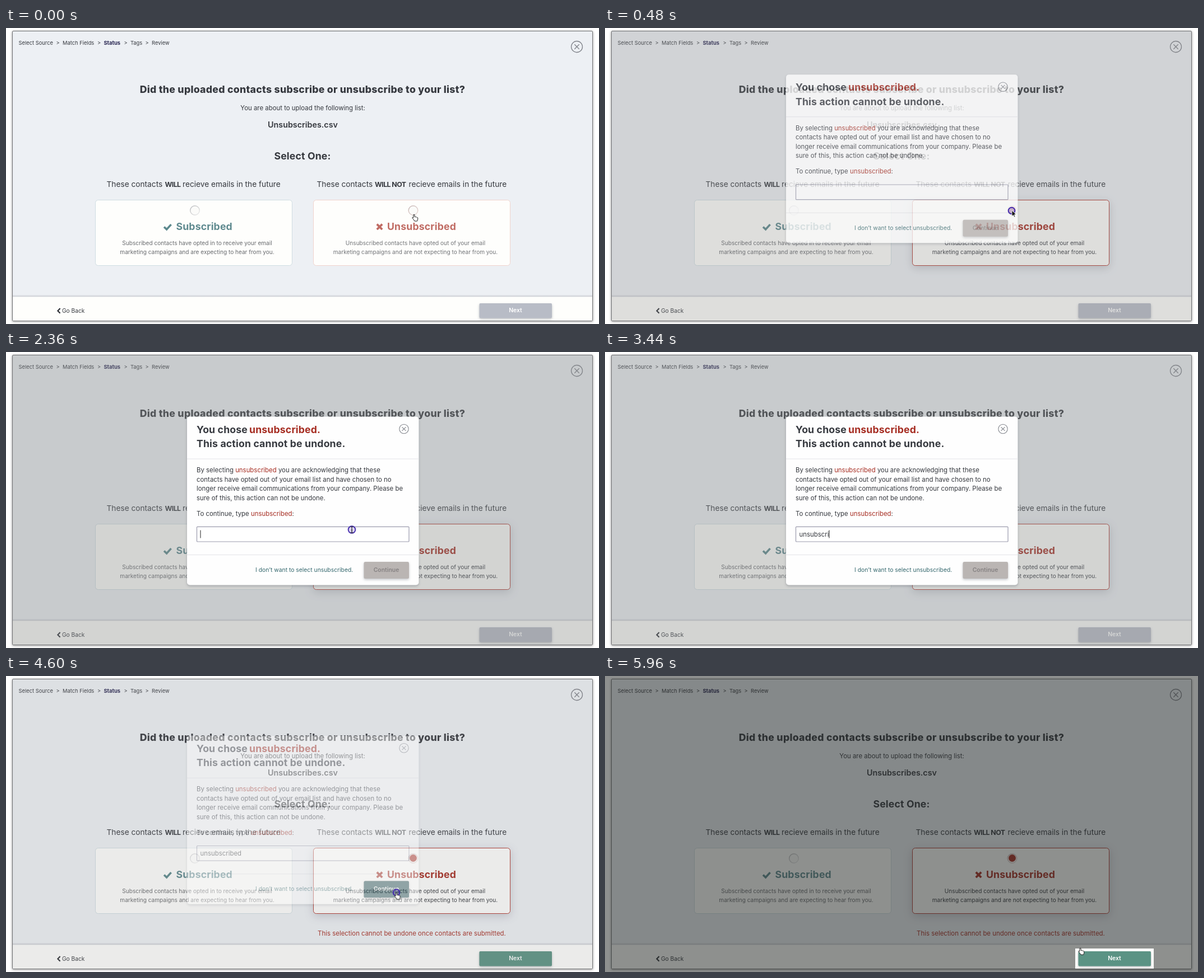
These frames come from a looping animation (1058 px wide and 529 px high, 6040 ms). An HTML page:

```html
<!DOCTYPE html>
<html lang="en">
<head>
<meta charset="utf-8">
<title>Contact status</title>
<style>
html, body { margin: 0; width: 100%; height: 100%; overflow: hidden; background: #fff; }
svg { display: block; width: 1058px; height: 529px; }
text { font-family: Inter, "Open Sans", sans-serif; font-size: 11.42px; fill: #36393f; white-space: pre; }
.mid { text-anchor: middle; }
.crumb { font-size: 9.35px; }
.head { font-size: 17.7px; font-weight: 800; letter-spacing: .27px; }
.sub { font-size: 17.7px; font-weight: 700; letter-spacing: .14px; }
.file { font-size: 14.3px; font-weight: 600; }
.fate { font-size: 13.7px; }
.loud { font-size: 12.4px; font-weight: 700; letter-spacing: -.6px; }
.desc { font-size: 10.08px; }
.btn { font-size: 10.4px; font-weight: 600; }
.link { font-size: 10.35px; fill: #35686e; }
.red { fill: #a62d22; }
.cross { fill: none; stroke: #82858c; stroke-width: 1.3; }
.rule { stroke: #e4e4e8; }
.window { filter: drop-shadow(0 1px 2px rgba(0,0,0,.4)); }
.soft { filter: drop-shadow(0 2px 2px rgba(60,65,80,.3)); }
.raised { filter: drop-shadow(0 4px 8px rgba(50,55,75,.22)); }

/* One loop is 6040 ms; 1% is 60.4 ms. */
.veil, .slide, .pick, .firm, .ready, .dim, .mouse, .hand, .arrow, .beam, .ring, .hold {
  animation: 6040ms linear infinite both;
}
.veil { animation-name: veil; }
.slide { animation-name: slide; }
.pick { animation-name: pick; }
.firm { animation-name: firm; }
.ready { animation-name: ready; }
.dim { animation-name: dim; }
.mouse { animation-name: mouse; animation-timing-function: ease-in-out; }
.hand { animation-name: hand; animation-timing-function: step-end; }
.arrow { animation-name: arrow; animation-timing-function: step-end; }
.beam { animation-name: beam; animation-timing-function: step-end; }
.hold { animation-name: hold; animation-timing-function: step-end; }
.ring { animation-name: ring; }
.ring, .hold { fill: #4a2cb5; fill-opacity: .2; stroke: #432aae; stroke-width: 2; }

@keyframes veil {
  0%, 7.28% { opacity: 0; }
  7.95% { opacity: .74; }
  8.28%, 75.55% { opacity: 1; }
  76.16% { opacity: .45; }
  76.7%, 100% { opacity: 0; }
}
@keyframes slide {
  0%, 7.81% { transform: translateY(-35.5px); animation-timing-function: ease-out; }
  10.6%, 75.55% { transform: none; }
  76.16% { transform: translateY(-8.5px); }
  77%, 100% { transform: translateY(-24px); }
}
@keyframes pick { 0%, 6.9% { opacity: 0; } 7.6%, 100% { opacity: 1; } }
@keyframes firm { 0%, 6.9% { opacity: .7; } 7.6%, 100% { opacity: 1; } }
@keyframes ready { 0%, 63.6% { opacity: 0; } 65.6%, 100% { opacity: 1; } }
@keyframes dim { 0%, 89.4% { opacity: 0; } 98.6%, 100% { opacity: 1; } }
@keyframes mouse {
  0%, .6% { transform: translate(728px, 333px); }
  6.6%, 11.5% { transform: translate(726px, 326px); }
  11.6%, 23.18% { transform: translate(726px, 327px); }
  27% { transform: translate(690px, 332px); }
  32.4%, 64.2% { transform: translate(617px, 317.5px); }
  72.85%, 89.4% { transform: translate(696.5px, 387px); }
  98%, 100% { transform: translate(848px, 486px); }
}
@keyframes hand { 0% { opacity: 1; } 7.12% { opacity: 0; } 70.1%, 100% { opacity: 1; } }
@keyframes arrow { 0% { opacity: 0; } 7.12% { opacity: 1; } 11.59% { opacity: 0; } 67.7% { opacity: 1; } 70.1%, 100% { opacity: 0; } }
@keyframes beam { 0% { opacity: 0; } 11.59% { opacity: 1; } 40.07% { opacity: 0; } 63.9% { opacity: 1; } 67.7%, 100% { opacity: 0; } }
@keyframes hold { 0% { opacity: 0; } 32.45% { opacity: 1; } 38.4%, 100% { opacity: 0; } }
@keyframes ring {
  0% { r: 3px; opacity: 1; }
  1% { r: 5.8px; opacity: 1; }
  7.6%, 100% { r: 16px; opacity: 0; }
}
</style>
</head>
<body>
<svg viewBox="0 0 1058 529">
  <defs>
    <linearGradient id="bevel" x1="0" y1="0" x2="1" y2="1">
      <stop offset="0" stop-color="#b9babd"/><stop offset="1" stop-color="#ececec"/>
    </linearGradient>
    <linearGradient id="lip" x1="0" y1="0" x2="0" y2="1">
      <stop offset="0" stop-color="#c8cad0" stop-opacity="0"/><stop offset="1" stop-color="#c8cad0"/>
    </linearGradient>
    <g id="radio">
      <circle r="8.3" fill="#fbfbf9" stroke="url(#bevel)" stroke-width="1.4"/>
    </g>
    <g id="close"><circle r="10"/><path d="M-4.2-4.2 4.2 4.2M4.2-4.2-4.2 4.2"/></g>
  </defs>

  <rect class="window" x="11.5" y="5.5" width="1035" height="518" rx="1.5" fill="#edf0f4" stroke="#707174"/>
  <rect x="12" y="476.5" width="1034" height="4" fill="url(#lip)"/>
  <rect x="12" y="480.5" width="1034" height="42.5" fill="#fefefc"/>

  <g>
    <text class="crumb" x="22.5" y="30">Select Source</text>
    <text class="crumb" x="89.5" y="30">&gt;</text>
    <text class="crumb" x="101" y="30">Match Fields</text>
    <text class="crumb" x="163" y="30">&gt;</text>
    <text class="crumb" x="174.5" y="30" style="font-weight:700;fill:#25234f">Status</text>
    <text class="crumb" x="210.5" y="30">&gt;</text>
    <text class="crumb" x="222" y="30">Tags</text>
    <text class="crumb" x="248.5" y="30">&gt;</text>
    <text class="crumb" x="260" y="30">Review</text>
  </g>
  <use href="#close" class="cross" transform="translate(1018.5 33.5)"/>

  <text class="mid head" x="529" y="116">Did the uploaded contacts subscribe or unsubscribe to your list?</text>
  <text class="mid" x="529.5" y="147">You are about to upload the following list:</text>
  <text class="mid file" x="529.5" y="178">Unsubscribes.csv</text>
  <text class="mid sub" x="529" y="235">Select One:</text>

  <text class="fate" x="179.5" y="284">These contacts <tspan class="loud" x="283.5">WILL</tspan><tspan x="315">recieve emails in the future</tspan></text>
  <text class="fate" x="554.5" y="284">These contacts <tspan class="loud" x="658">WILL NOT</tspan><tspan x="718.5">recieve emails in the future</tspan></text>

  <!-- subscribed card -->
  <rect x="159.5" y="307.5" width="351" height="117" rx="5" fill="#fefefc" stroke="#cfdde2"/>
  <use href="#radio" x="337" y="326"/>
  <path d="M282 355.5l4.6 4.4 8-8.8" fill="none" stroke="#5c898d" stroke-width="3.6"/>
  <text class="sub" x="303.5" y="361" style="fill:#5f8a8f">Subscribed</text>
  <g opacity=".75">
    <text class="mid desc" x="341" y="387.5">Subscribed contacts have opted in to receive your email</text>
    <text class="mid desc" x="341" y="403.5">marketing campaigns and are expecting to hear from you.</text>
  </g>

  <!-- unsubscribed card -->
  <rect x="548.5" y="307.5" width="351" height="117" rx="5" fill="#fefefc" stroke="#f0d3cd"/>
  <rect class="pick raised" x="548.5" y="307.5" width="351" height="117" rx="5" fill="#fefefc" stroke="#b23a30"/>
  <use href="#radio" x="726.5" y="326"/>
  <circle cx="726.5" cy="326" r="8.3" fill="none" stroke="#eab8ae" opacity=".5"/>
  <circle class="pick" cx="726.5" cy="325.5" r="6.5" fill="#a62d22"/>
  <g class="firm">
    <path d="M661.8 350.6l9.4 9.4m0-9.4-9.4 9.4" stroke="#a62d22" stroke-width="3.8"/>
    <text class="sub red" x="680" y="361">Unsubscribed</text>
    <text class="mid desc" x="730.5" y="387.5">Unsubscribed contacts have opted out of your email</text>
    <text class="mid desc" x="730.5" y="403.5">marketing campaigns and are not expecting to hear from you.</text>
  </g>
  <text class="ready mid red" x="724" y="464">This selection cannot be undone once contacts are submitted.</text>

  <path d="M96.6 501l-4.2 4.4 4.2 4.4" fill="none" stroke="#2f3238" stroke-width="2.2"/>
  <text x="100" y="509" style="font-size:10.2px">Go Back</text>
  <rect class="soft" x="844.5" y="492" width="129.5" height="26.5" rx="2" fill="#b8bcc6"/>
  <rect class="ready" x="844.5" y="492" width="129.5" height="26.5" rx="2" fill="#5b9384"/>
  <text class="mid btn" x="909" y="508" style="fill:#fff">Next</text>

  <rect class="veil" x="12" y="6" width="1034" height="517" fill="#858787" fill-opacity=".36"/>

  <!-- dialog -->
  <g class="veil"><g class="slide">
    <rect class="soft" x="323" y="115.5" width="413.5" height="301" rx="5" fill="#fefefe"/>
    <text class="sub" x="340" y="144.5">You chose <tspan class="red" x="434">unsubscribed.</tspan></text>
    <text class="sub" x="340" y="170">This action cannot be undone.</text>
    <use href="#close" class="cross" transform="translate(710 137.5) scale(.82)"/>
    <path class="rule" d="M323 191H736.5M323 362.5H736.5"/>
    <text x="340" y="215">By selecting <tspan class="red">unsubscribed</tspan> you are acknowledging that these</text>
    <text x="340" y="231.5">contacts have opted out of your email list and have chosen to no</text>
    <text x="340" y="248">longer receive email communications from your company. Please be</text>
    <text x="340" y="264.5">sure of this, this action can not be undone.</text>
    <text x="340" y="292.5">To continue, type <tspan class="red">unsubscribed</tspan>:</text>
    <rect x="340.5" y="312.3" width="378.5" height="26.7" rx="1" fill="#fff" stroke="#9b9bad" stroke-width="1.2"/>
    <text id="typed" x="346.5" y="330"></text>
    <rect id="caret" y="318.5" width="1" height="14" fill="#222"/>
    <text class="link" x="445" y="393">I don’t want to select unsubscribed.</text>
    <rect class="soft" x="638.5" y="375" width="80.5" height="30" rx="2.5" fill="#bab5b3"/>
    <text class="mid btn" x="678.5" y="393" style="fill:#868283">Continue</text>
    <g class="ready">
      <rect x="638.5" y="375" width="80.5" height="30" rx="2.5" fill="#1a474e"/>
      <text class="mid btn" x="678.5" y="393" style="fill:#fff">Continue</text>
    </g>
  </g></g>

  <path class="dim" d="M0 0H1058V529H0ZM839 487V523H979V487Z" fill="#282b2a" fill-rule="evenodd" fill-opacity=".52"/>

  <!-- clicks and pointer -->
  <circle class="ring" cx="725.5" cy="326.5" style="animation-delay:-5620ms"/>
  <circle class="hold" cx="617" cy="317.5" r="5.8"/>
  <circle class="ring" cx="617" cy="317.5" style="animation-delay:-3760ms"/>
  <circle class="ring" cx="696.5" cy="387" style="animation-delay:-1500ms"/>
  <g class="mouse">
    <path class="hand" d="M-1 .8q1-1.5 2 0l.3 4 1-.5 1 .7 1.1-.3.9.9 1 .1.5 1.2-.3 3-.9 2.2H1l-2.3-3.4-1.8-2.2.3-1.1 1.6.7z" fill="#fff" stroke="#222" stroke-width="1" stroke-linejoin="round"/>
    <path class="arrow" d="M0 0v10.5l2.5-2.3 1.6 3.8 1.7-.7-1.6-3.7h3.4z" fill="#111" stroke="#fff" stroke-width=".8"/>
    <path class="beam" d="M-2.5-5.5q2.5 0 2.5 1.5 0-1.5 2.5-1.5M0-4.5v9M-2.5 5.5Q0 5.5 0 4 0 5.5 2.5 5.5M-1.2.8h2.4" fill="none" stroke="#222" stroke-width="1.1"/>
  </g>
</svg>
<script>
const LOOP = 6040, WORD = "unsubscribed";
const KEYS = [2400, 2600, 2720, 2920, 3000, 3080, 3240, 3360, 3440, 3600, 3640, 3800];
const typed = document.getElementById("typed");
const caret = document.getElementById("caret");
const start = performance.now();

function draw() {
  const t = (performance.now() - start) % LOOP;
  const count = KEYS.filter(k => t >= k).length;
  typed.textContent = WORD.slice(0, count);
  caret.setAttribute("x", 346.5 + (count ? typed.getComputedTextLength() : 0));
  caret.setAttribute("opacity", t >= 1960 && t < 4320 ? 1 : 0);
  requestAnimationFrame(draw);
}
draw();
</script>
</body>
</html>
```
